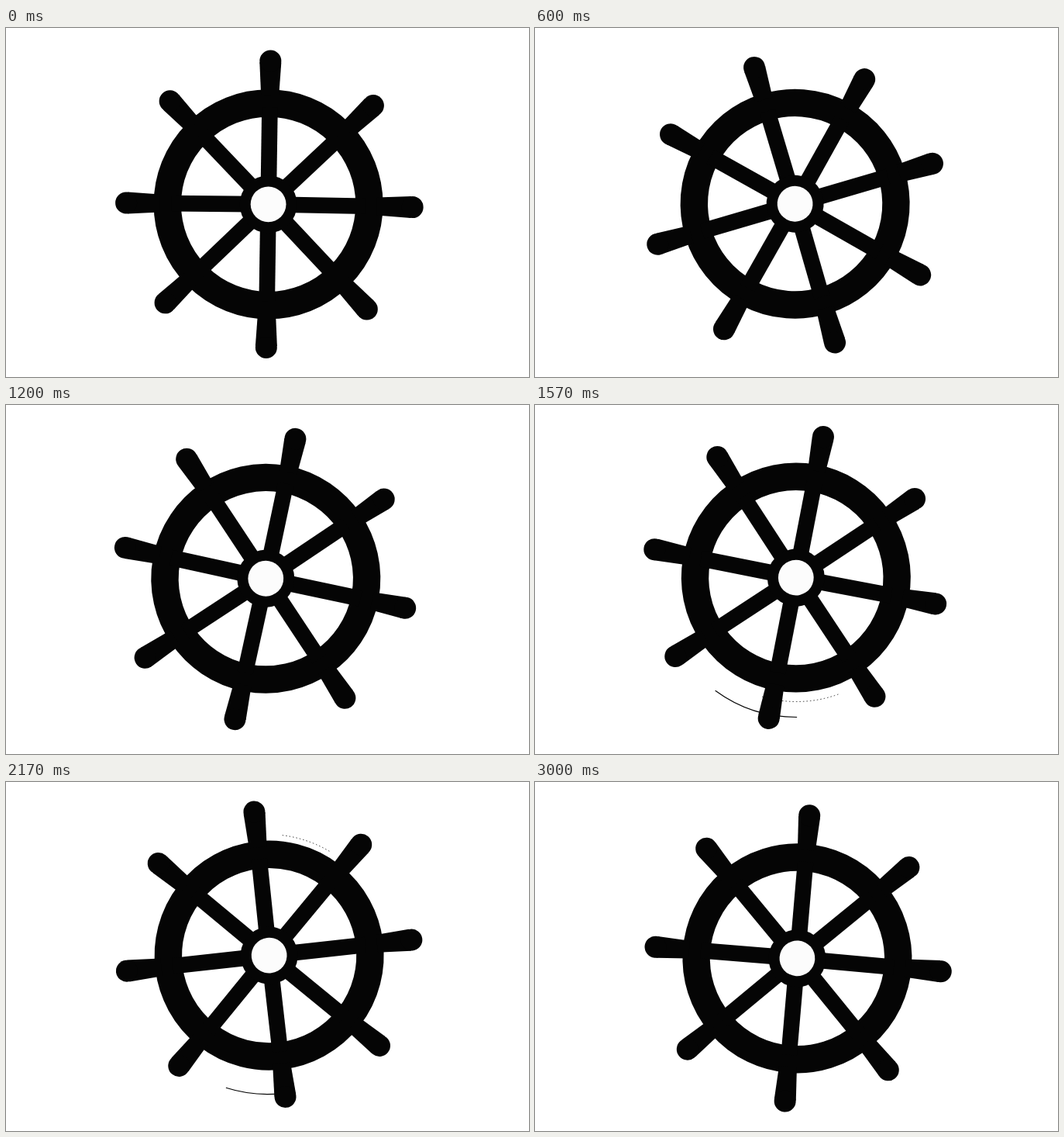
Animation of 675 by 450 pixels, one loop 3030 ms. Source, as an HTML page with a canvas:

```html
<!DOCTYPE html>
<html lang="en">
<head>
<meta charset="utf-8">
<title>Ship's wheel</title>
<style>
  html, body { margin: 0; width: 100%; height: 100%; overflow: hidden; background: #fff; }
  canvas { display: block; width: 675px; height: 450px; }
</style>
</head>
<body>
<canvas id="stage" width="675" height="450"></canvas>
<script>
const ctx = document.getElementById('stage').getContext('2d');
const LOOP = 3030;
const TAU = Math.PI * 2;
const RAD = Math.PI / 180;
const STEP = 360 / 89;      // degrees turned per step
const ARMS = 8;
const INK = '#050505';
const LIFE = 12;            // steps a swept line stays visible

// Thin lines swept beside the rim: first step, solid line angle, dotted line angle
const SWEEPS = [[0, 146, -24.5], [23, 47.8, 239], [38, 89.8, 70], [59, 83.3, -83], [68, -98, 109]];

function disc(r, color, y = 0) {
  ctx.fillStyle = color;
  ctx.beginPath();
  ctx.arc(0, y, r, 0, TAU);
  ctx.fill();
}

function arm(length) {
  ctx.fillStyle = INK;
  ctx.fillRect(-10.3, -125, 20.6, 105);
  ctx.beginPath();
  ctx.moveTo(-11.5, -140);
  ctx.lineTo(-14, 2 - length);
  ctx.lineTo(14, 2 - length);
  ctx.lineTo(11.5, -140);
  ctx.fill();
  disc(14, INK, -length);
}

function wheel() {
  ctx.strokeStyle = INK;
  ctx.lineWidth = 35.4;
  ctx.beginPath();
  ctx.arc(0, 0, 130.3, 0, TAU);
  ctx.stroke();
  for (let i = 0; i < ARMS; i++) {
    // The two crosses and the right side are a little uneven
    const angle = i * 360 / ARMS;
    const lean = Math.sin(angle * RAD);
    ctx.save();
    ctx.rotate((angle + 0.85 + 0.7 * (i % 2) + 0.3 * lean) * RAD);
    arm(184.8 + 1.3 * lean);
    ctx.restore();
  }
  disc(37, INK);
  disc(22.9, '#fcfcfc');
}

function sweep(r, angle, span, width, dash) {
  ctx.lineWidth = width;
  ctx.setLineDash(dash);
  ctx.beginPath();
  ctx.arc(0, 0, r, angle * RAD, (angle + span) * RAD);
  ctx.stroke();
}

function sweeps(n) {
  ctx.strokeStyle = INK;
  for (const [first, solid, dotted] of SWEEPS) {
    const age = n - first;
    if (age <= 0 || age > LIFE) continue;
    sweep(177.5, solid, age * STEP, 1.2, []);
    sweep(157.5, dotted, age * STEP, 0.8, [1.5, 3]);
  }
  ctx.setLineDash([]);
}

// Thirty steps per second, on a 10 ms clock
function stepAt(ms) {
  return Math.floor((Math.floor(ms / 10) + 0.34) * 0.3);
}

function render(ms) {
  const n = stepAt(ms % LOOP);
  ctx.fillStyle = '#fff';
  ctx.fillRect(0, 0, 675, 450);
  ctx.save();
  ctx.translate(337.5, 225);
  sweeps(n);
  ctx.rotate(n * STEP * RAD);
  ctx.translate(1.1, 2.3);  // the hub sits slightly off the pivot
  wheel();
  ctx.restore();
}

const start = performance.now();
function tick() {
  render(Math.max(0, performance.now() - start));
  requestAnimationFrame(tick);
}
tick();
</script>
</body>
</html>
```
